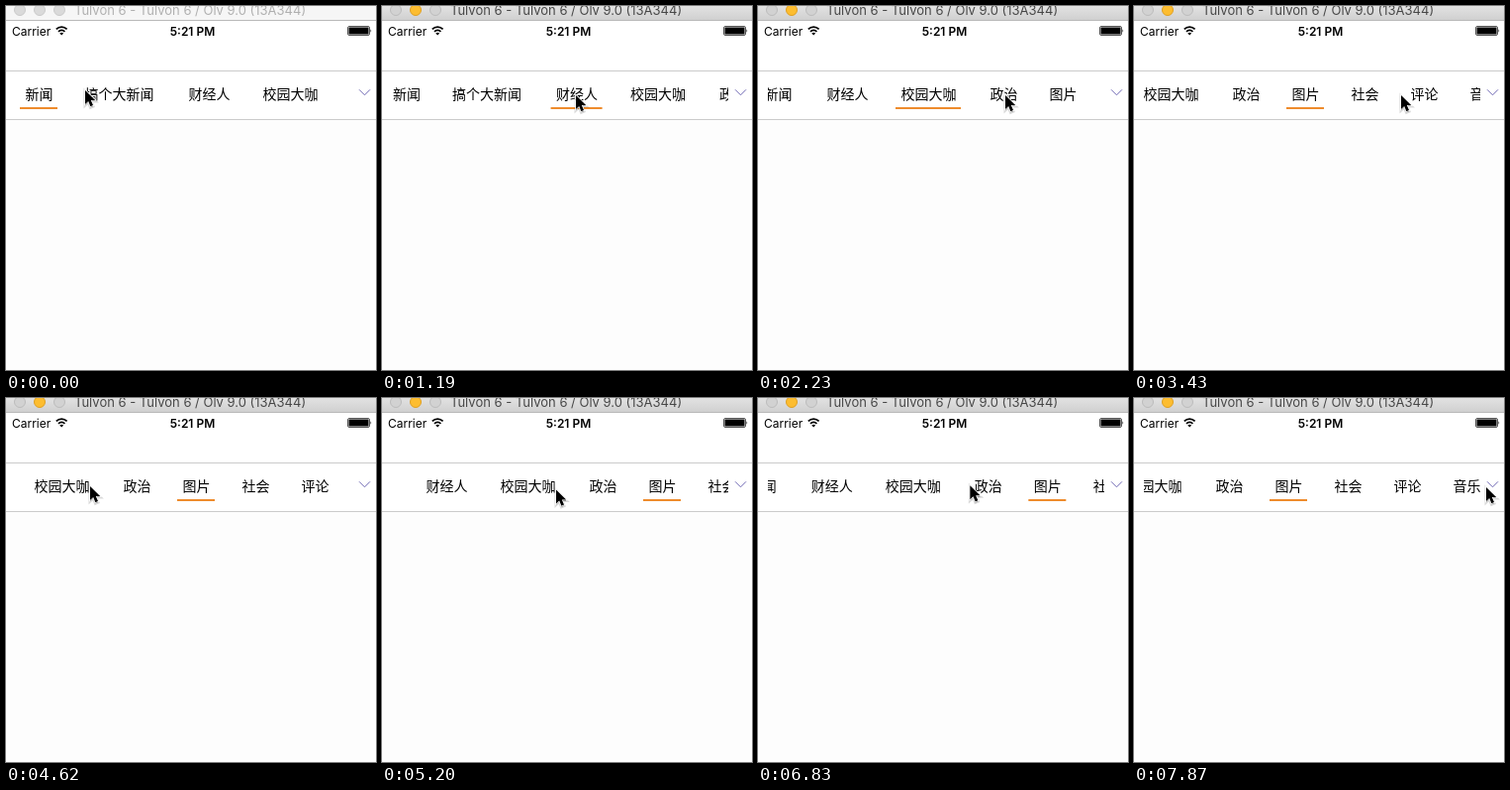
An HTML page for the animation above (8000 ms loop, 374 px wide and 367 px high).

```html
<!DOCTYPE html>
<html lang="zh-CN">
<head>
<meta charset="utf-8">
<title>Scrolling tab bar</title>
<style>
  html, body { margin: 0; width: 100%; height: 100%; overflow: hidden; background: #fdfdfd; }
  svg { display: block; width: 374px; height: 367px; font: 12px Inter, sans-serif; }
  #title { font-size: 13px; fill: #b0b0b0; }
  #lights circle { fill: #dadada; stroke: #cbcbcb; }
  .active #title { fill: #484848; }
  .active #bar { fill: url(#metal); }
  .active #lights circle { fill: #d2d2d2; stroke: #bcbcbc; }
  .active #lights .mid { fill: #fdbd30; stroke: #dfa023; }
  #strip { font: 14px "Noto Sans CJK SC", "Noto Sans CJK", sans-serif; }
</style>
</head>
<body>
<svg id="stage" viewBox="0 0 374 367">
  <defs>
    <linearGradient id="metal" x2="0" y2="1">
      <stop stop-color="#e2e2e2"/><stop offset="1" stop-color="#d0d0d0"/>
    </linearGradient>
    <clipPath id="view"><rect x="10" y="66" width="340" height="48"/></clipPath>
  </defs>
  <rect width="374" height="114" fill="#fff"/>
  <rect id="bar" width="374" height="14" fill="#f6f6f6"/>
  <path d="M0 14.5H374" stroke="#b9b9b9"/>
  <g id="lights">
    <circle cx="14" cy="4" r="5.5"/><circle class="mid" cx="34" cy="4" r="5.5"/><circle cx="54" cy="4" r="5.5"/>
  </g>
  <text id="title" x="69" y="9">Tulvon 6 - Tulvon 6 / Olv 9.0 (13A344)</text>

  <text x="6" y="30">Carrier</text>
  <g fill="none" stroke="#000" stroke-width="1.7">
    <path d="M50.8 23.4a7.6 7.6 0 0 1 10.8 0M53 25.8a4.5 4.5 0 0 1 6.4 0"/>
    <path d="M56.2 29.6l-1.9-2a2.7 2.7 0 0 1 3.8 0z" fill="#000" stroke="none"/>
  </g>
  <text x="188.5" y="30" text-anchor="middle" font-weight="600">5:21 PM</text>
  <rect x="345.5" y="20.5" width="22" height="9" rx="1.5" fill="none" stroke="#555"/>
  <rect x="346.5" y="21.5" width="20" height="7" rx=".5"/>
  <path d="M368.5 23.2q1.5 1.8 0 3.6z"/>

  <path d="M0 65.5H374M0 114.5H374" stroke="#cbcbcb"/>
  <g clip-path="url(#view)"><g id="strip"><rect id="underline" y="102" height="2" fill="#ee8c2d"/></g></g>
  <path d="M357 84.3l5.5 5.5 5.5-5.5" fill="none" stroke="#6f68b4"/>
  <g id="cursor">
    <path d="M0 1V15L3.2 12 5.4 17.2 8 16.1 5.8 11H10.2Z" stroke="#000" stroke-opacity=".15" stroke-width="3"/>
    <path d="M0 0V14L3.2 11 5.4 16.2 8 15.1 5.8 10H10.2Z" stroke="#fff" stroke-width="1.6" paint-order="stroke"/>
  </g>
</svg>
<script>
const $ = id => document.getElementById(id);
const stage = $('stage'), strip = $('strip'), underline = $('underline'), cursor = $('cursor');
const LOOP = 8000, CHAR = 14, CENTER = 175;

// Each tab takes 15px per character plus a 30px gap.
let left = 20;
const tabs = ['新闻', '搞个大新闻', '财经人', '校园大咖', '政治', '图片', '社会', '评论', '音乐'].map(name => {
  const tab = { x: left, chars: name.length };
  const text = document.createElementNS('http://www.w3.org/2000/svg', 'text');
  text.textContent = name;
  text.setAttribute('x', left - 0.5);
  text.setAttribute('y', 94);
  strip.append(text);
  left += name.length * 15 + 30;
  return tab;
});

// Screen updates come in bursts: first update, last update, count.
const bursts = [[0, 0, 1], [300, 300, 1], [600, 890, 3], [1190, 2230, 8], [2380, 3130, 6], [3430, 3720, 3],
  [4020, 4170, 2], [4620, 5500, 7], [5940, 6090, 2], [6540, 7130, 5], [7420, 7870, 4]];

// Pointer path: time, x, y.
const path = [[0, 80, 85], [450, 80, 85], [890, 196, 90], [1490, 196, 90], [1780, 250, 90], [2230, 250, 90],
  [2680, 297, 90], [3280, 297, 90], [3430, 270, 90], [3720, 81, 96], [3870, 81, 96], [4170, 56, 90],
  [4470, 56, 90], [4620, 85, 89], [5500, 267, 96], [5790, 267, 96], [6090, 306, 91], [6390, 306, 91],
  [7130, 78, 84], [7270, 78, 84], [7870, 356, 90]];

// Taps: time, tab index.
const taps = [[1090, 2], [1880, 3], [2780, 5]];

const clamp = (v, lo, hi) => Math.min(hi, Math.max(lo, v));

function snap(t) {
  const [start, end, count] = bursts.findLast(b => b[0] <= t);
  if (count === 1) return start;
  const gap = (end - start) / (count - 1);
  return start + gap * Math.min(count - 1, Math.floor((t - start) / gap + 0.01));
}

function pointer(t) {
  const i = path.findIndex(k => k[0] >= t);
  if (i < 0) return path.at(-1).slice(1);
  if (i === 0) return path[0].slice(1);
  const [t0, x0, y0] = path[i - 1], [t1, x1, y1] = path[i];
  const p = (t - t0) / (t1 - t0);
  return [x0 + (x1 - x0) * p, y0 + (y1 - y0) * p];
}

function tapScroll(t) {
  return taps.reduce((scroll, [start, index]) => {
    const p = clamp((t - start) / 300, 0, 1);
    const goal = tabs[index].x + tabs[index].chars * 7.5 - CENTER;
    return scroll + (goal - scroll) * p * p * (3 - 2 * p);
  }, 0);
}

// Dragging starts after 10px of pointer travel.
function scrollAt(t) {
  if (t < 4470) return tapScroll(t);
  if (t < 6390) return 250 - Math.max(0, pointer(Math.min(t, 5500))[0] - 66);
  return 49 + Math.max(0, 296 - pointer(Math.min(t, 7130))[0]);
}

function draw(now) {
  const t = snap(now % LOOP);
  const tap = taps.findLast(k => k[0] <= t);
  const { x, chars } = tabs[tap ? tap[1] : 0];
  stage.classList.toggle('active', t >= 300);
  underline.setAttribute('x', x - 6);
  underline.setAttribute('width', chars * CHAR + 10);
  strip.setAttribute('transform', `translate(${-scrollAt(t)} 0)`);
  cursor.setAttribute('transform', `translate(${pointer(t)})`);
  requestAnimationFrame(draw);
}
draw(performance.now());
</script>
</body>
</html>
```
